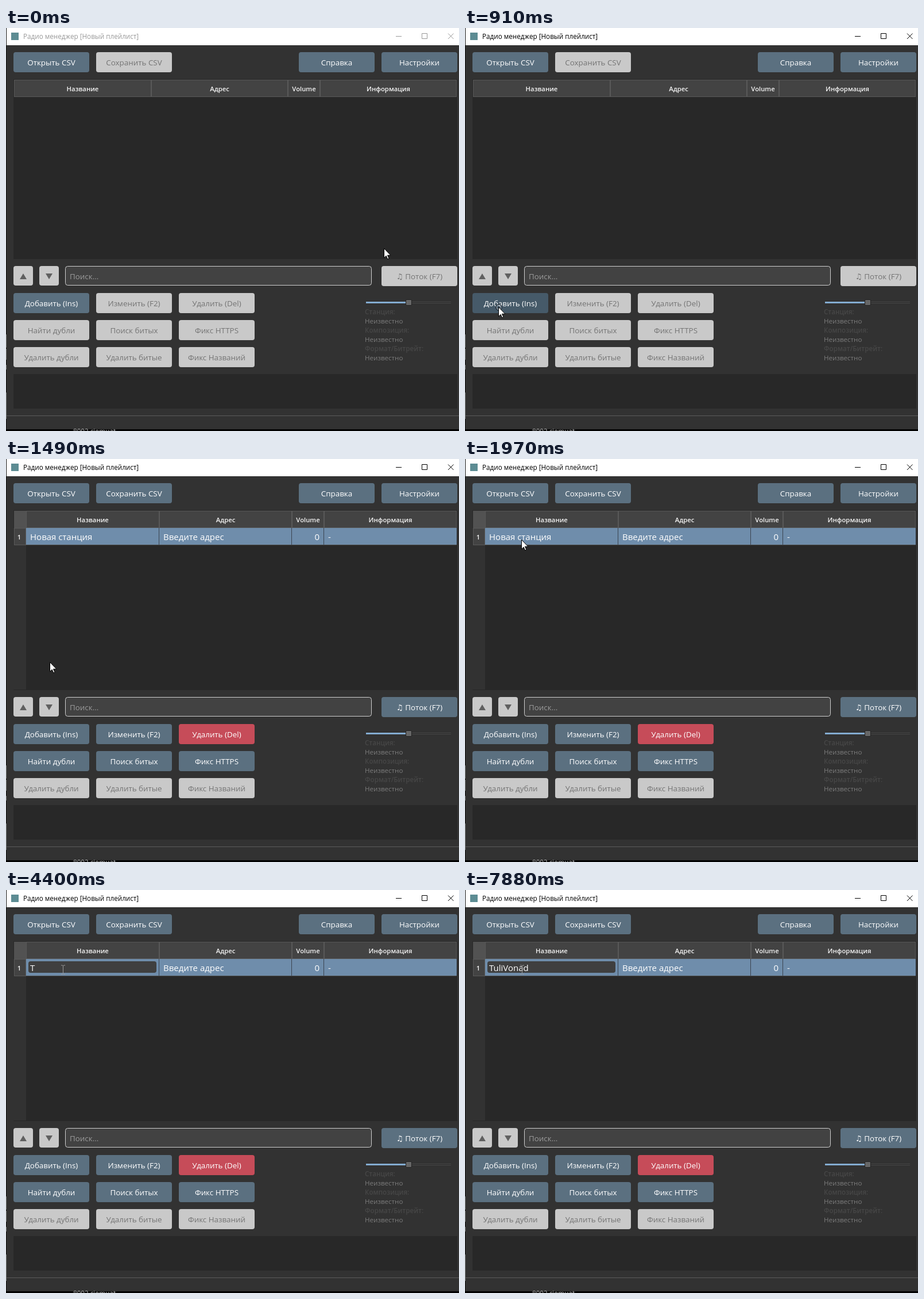
Write an HTML page that moves like this. It is 789 by 701 pixels and loops after 8000 ms.

```html
<!DOCTYPE html>
<html lang="ru">
<head>
<meta charset="utf-8">
<title>Радио менеджер</title>
<style>
  html, body { margin: 0; width: 100%; height: 100%; overflow: hidden; background: #323232; }
  svg { display: block; width: 789px; height: 701px; font-family: "Open Sans", "Noto Sans", "DejaVu Sans", sans-serif; }
  text { white-space: pre; }
  .title { font-size: 11.7px; }
  .btn { font-size: 13.4px; text-anchor: middle; }
  .head { font-size: 11.3px; font-weight: 600; text-anchor: middle; fill: #f4f4f4; }
  .cell { font-size: 15px; fill: #fff; }
  .info { font-size: 11.6px; fill: #7b7b7b; }
  .info.name { font-weight: 600; fill: #474747; }
</style>
</head>
<body>
<svg id="stage" viewBox="0 0 789 701"></svg>
<script>
const LOOP = 8000;
const BLUE = '#5b7080', HOVER = '#6f8dab', PRESS = '#465a69', RED = '#c64c59', OFF = '#c9c9c9';
const stage = document.getElementById('stage');

function add(tag, attrs, parent = stage, content = '') {
  const el = document.createElementNS('http://www.w3.org/2000/svg', tag);
  for (const k in attrs) el.setAttribute(k, attrs[k]);
  el.textContent = content;
  return parent.appendChild(el);
}
const group = () => add('g', {});
const rect = (x, y, width, height, fill, parent, more) =>
  add('rect', { x, y, width, height, fill, ...more }, parent);
const text = (x, y, cls, content, parent, more) =>
  add('text', { x, y, class: cls, ...more }, parent, content);
const path = (d, attrs, parent) => add('path', { d, fill: 'none', ...attrs }, parent);
const show = (el, on) => el.setAttribute('visibility', on ? 'visible' : 'hidden');

// window frame
rect(0, 0, 1, 701, '#151515');
[[533, 23], [558, 19], [586, 8], [634, 46]].forEach(([y, h]) => rect(0, y, 1, h, '#77797a'));
rect(1, 0, 788, 30, '#fff');
rect(9, 8, 13, 13, '#5d8c93');
const title = text(30, 19, 'title', 'Радио менеджер [Новый плейлист]');
const controls = path('M679 14.5h10M724.5 9.5h9v9h-9zM770 9.5l9.5 9.5M779.5 9.5l-9.5 9.5', {});
rect(1, 674, 788, 1, '#5c5c5c');
rect(0, 698, 789, 3, '#000');
text(117, 706, 'title', '8002 ciomuat', stage, { fill: '#bbb', 'font-size': 11 });

// buttons
function button(x, y, label, color, width = 132, height = 35) {
  const box = rect(x, y, width, height, BLUE, stage, { rx: 4 });
  const caption = text(x + width / 2, y + 23, 'btn', label);
  const paint = fill => {
    box.setAttribute('fill', fill);
    caption.setAttribute('fill', fill === OFF ? '#747474' : '#fff');
  };
  paint(color);
  return paint;
}
button(13, 42, 'Открыть CSV', BLUE);
const save = button(157, 42, 'Сохранить CSV', OFF);
button(510, 42, 'Справка', BLUE);
button(654, 42, 'Настройки', BLUE);
button(13, 414, '', OFF, 34, 34);
button(58, 414, '', OFF, 34, 34);
path('M24 437h12l-6-10zM69 427h12l-6 10z', { fill: '#606060' });
const stream = button(654, 414, '♫ Поток (F7)', OFF);
const insert = button(13, 461, 'Добавить (Ins)', BLUE);
const edit = button(157, 461, 'Изменить (F2)', OFF);
const remove = button(301, 461, 'Удалить (Del)', OFF);
const extras = ['Найти дубли', 'Поиск битых', 'Фикс HTTPS']
  .map((label, i) => button(13 + 144 * i, 508, label, OFF));
['Удалить дубли', 'Удалить битые', 'Фикс Названий']
  .forEach((label, i) => button(13 + 144 * i, 555, label, OFF));

// search, slider, stream info, log
rect(103.5, 414.5, 533, 33, '#424242', stage, { rx: 4, stroke: '#cfcfcf' });
text(111, 437, 'btn', 'Поиск...', stage, { fill: '#9b9b9b', style: 'text-anchor:start' });
rect(627, 476, 148, 3, '#4b4b4b');
rect(627, 477, 148, 1, '#222');
rect(627, 476, 74, 3, '#83abd0');
rect(696.5, 472.5, 10, 10, '#666', stage, { rx: 1.5, stroke: '#222' });
['Станция:', 'Композиция:', 'Формат/Битрейт:'].forEach((label, i) => {
  text(625, 498 + 32 * i, 'info name', label);
  text(625, 514 + 32 * i, 'info', 'Неизвестно');
});
rect(13, 602, 773, 60, '#282828');

// table
rect(13, 89, 773, 313, '#282828');
function header(edges) {
  const g = group();
  ['Название', 'Адрес', 'Volume', 'Информация'].forEach((label, i) => {
    const x = edges[i], w = edges[i + 1] - x;
    rect(x + .5, 90.5, w - 1, 29, '#434343', g, { stroke: '#595959' });
    text(x + w / 2, 110, 'head', label, g);
  });
  return g;
}
const empty = header([14, 253, 491, 547, 785]);
const filled = header([35, 267, 498, 554, 785]);
rect(14, 90, 21, 30, '#525252', filled);
rect(13, 120, 22, 281, '#323232', filled);
rect(14.5, 120.5, 20, 29, '#434343', filled, { stroke: '#595959' });
text(23, 140, 'head', '1', filled);
rect(35, 120, 750, 29, HOVER, filled);
rect(35, 149, 750, 1, '#4a4a4a', filled);
[266, 497, 553].forEach(x => rect(x, 120, 1, 29, '#3a4350', filled));
const name = text(42, 141, 'cell', 'Новая станция', filled);
text(274, 141, 'cell', 'Введите адрес', filled);
text(546, 141, 'cell', '0', filled, { 'text-anchor': 'end' });
text(561, 141, 'cell', '-', filled);

// cell editor
const editor = group();
rect(39, 124, 223, 20, '#3f3f3f', editor, { rx: 4 });
const selection = rect(42, 125, 106, 18, HOVER, editor);
const typed = text(42, 141, 'cell', '', editor);
const caret = rect(0, 125, 1, 18, '#ddd', editor);

// pointers
const beam = path('M96 131h2.5l1 1 1-1h2.5M99.5 132v13M96 146.5h2.5l1-1 1 1h2.5', { stroke: '#9a9a9a' });
const ring = add('circle', { fill: 'none', stroke: '#141d28', 'stroke-width': 1.3 });
const halo = add('circle', { fill: 'none', stroke: '#d5dde5', 'stroke-width': .7 });
const arrow = path('M.5 .5V16.8L4.2 13.3 6.7 19 9 18 6.5 12.3H11.8Z',
  { style: 'fill:#fff', stroke: '#000', 'stroke-width': 1 });

const OLD = 'Новая станция', WORD = 'TuliVonad';
const KEYS = [3750, 4590, 4930, 5120, 6050, 6520, 6920, 7040, 7320];
const CARET_OFF = [[2790, 3320], [4400, 4590], [5710, 6050], [7880, 8000]];
const within = (t, a, b) => t >= a && t < b;
const ease = p => p * p * (3 - 2 * p);

// progress from first to last in discrete hops
function hops(t, first, last, n) {
  if (t < first) return 0;
  const i = Math.floor((t - first) / ((last - first) / (n - 1)) + 1e-6) + 1;
  return ease(Math.min(i / n, 1));
}

function pointer(t) {
  if (t < 1190) {
    const p = hops(t, 60, 640, 13);
    return [658 - 600 * p, 383 + 102 * p];
  }
  const p = hops(t, 1190, 1970, 14), q = 1 - p;
  return [58 * q * q + 164 * p * q + 98 * p * p, 485 * q * q + 640 * p * q + 140 * p * p];
}

function click(t, x, y, starts) {
  const s = starts.find(v => within(t, v, v + 150));
  const r = s === undefined ? 0 : t - s < 60 ? 5 : 9;
  [ring, halo].forEach((c, i) => {
    c.setAttribute('cx', x);
    c.setAttribute('cy', y);
    c.setAttribute('r', Math.max(r - i, 0));
    show(c, r > 0);
  });
}

function render(t) {
  const active = t >= 820, ready = t >= 1030, editing = t >= 2240;
  title.setAttribute('fill', active ? '#000' : '#999');
  controls.setAttribute('stroke', active ? '#000' : '#999');
  show(empty, !ready);
  show(filled, ready);
  [save, stream, edit, ...extras].forEach(paint => paint(ready ? BLUE : OFF));
  remove(ready ? RED : OFF);

  const [x, y] = pointer(t).map(Math.round);
  const over = within(x, 13, 145) && within(y, 461, 496);
  insert(within(t, 820, 1030) ? PRESS : over ? HOVER : BLUE);
  arrow.setAttribute('transform', `translate(${x} ${y})`);
  show(arrow, t < 2360);
  show(beam, t >= 2580);
  click(t, x + 1, y + 1, t < 1030 ? [880] : [2030, 2180]);

  const count = KEYS.filter(k => t >= k).length;
  typed.textContent = count ? WORD.slice(0, count) : OLD;
  const width = typed.getComputedTextLength();
  selection.setAttribute('width', width);
  caret.setAttribute('x', Math.round(42 + width));
  show(editor, editing);
  show(name, ready && !editing);
  show(selection, editing && !count);
  show(caret, editing && !CARET_OFF.some(([a, b]) => within(t, a, b)));
}

const start = performance.now();
function frame() {
  render((performance.now() - start) % LOOP);
  requestAnimationFrame(frame);
}
frame();
</script>
</body>
</html>
```
